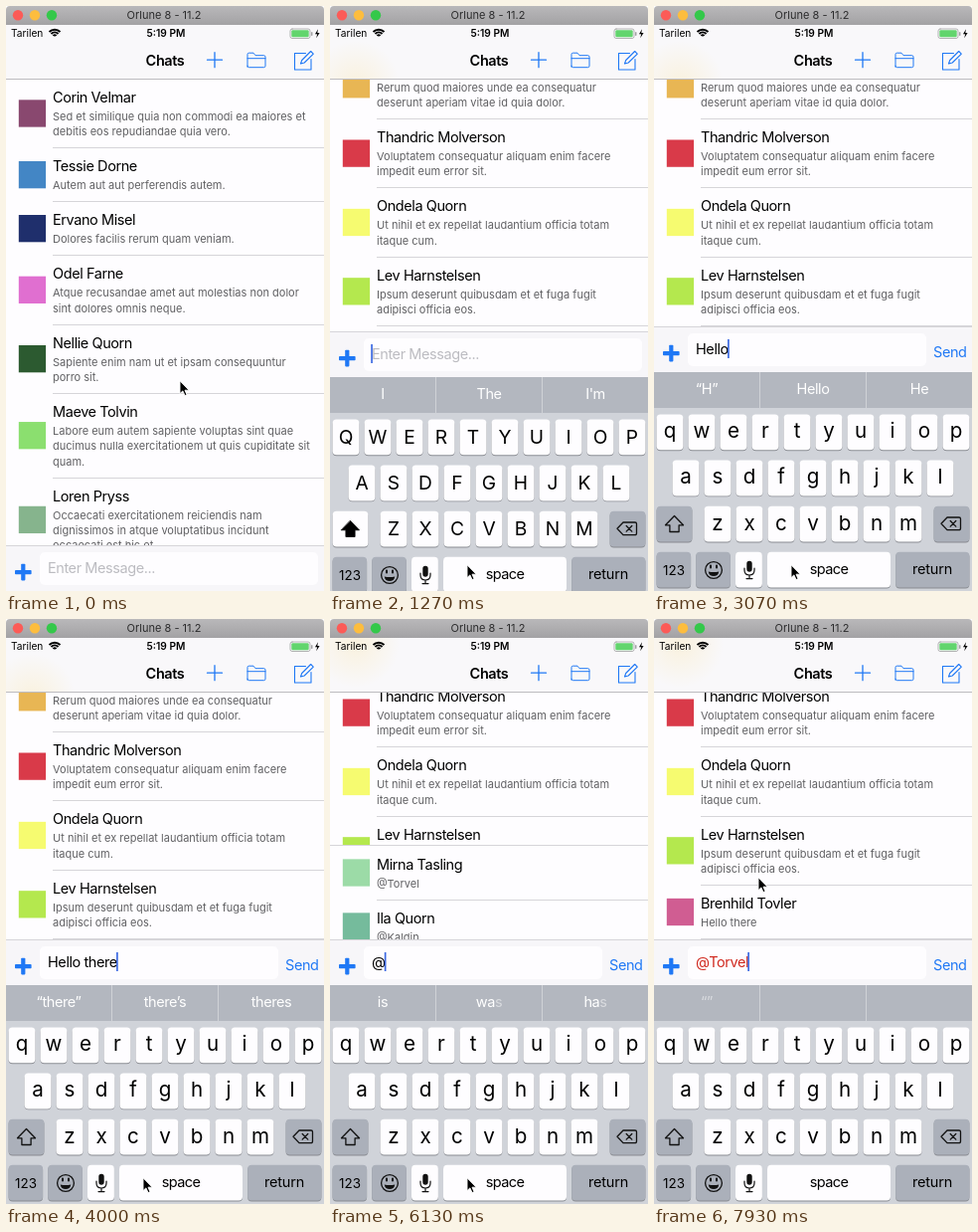
An HTML page with a canvas that plays this animation: 320 px wide and 588 px high, repeating every 8000 ms.

```html
<!DOCTYPE html>
<html lang="en">
<head>
<meta charset="utf-8">
<title>Chats</title>
<style>
  html, body { margin: 0; width: 100%; height: 100%; overflow: hidden; background: #fff; }
  canvas { display: block; width: 320px; height: 588px; }
</style>
</head>
<body>
<canvas id="stage"></canvas>
<script>
const W = 320, H = 588, LOOP = 8000, FRAME = 1000 / 15;
const canvas = document.getElementById('stage');
const ctx = canvas.getContext('2d');
const ratio = window.devicePixelRatio || 1;
canvas.width = W * ratio;
canvas.height = H * ratio;

const BLUE = '#1f78f5', LINE = '#d6d5d9';
const LIST_TOP = 73.3, BAR_HEIGHT = 46, BAR_DOCKED = 322, KEYBOARD_TRAVEL = 220;
const KEY_TOP = 410.5, KEY_PITCH = 46.1, KEY_HEIGHT = 35.8;
const OPEN = 1005, JUMP = 1195, TYPE = 2550, KEY_STEP = 112, SENT = 4060, MENTION = 5930, PICK = 7730;
const PHRASE = 'Hello there', HANDLE = '@Torvel';

const chats = [
  ['#89486f', 'Corin Velmar', 'Sed et similique quia non commodi ea maiores et', 'debitis eos repudiandae quia vero.'],
  ['#4386c5', 'Tessie Dorne', 'Autem aut aut perferendis autem.'],
  ['#1f2f6c', 'Ervano Misel', 'Dolores facilis rerum quam veniam.'],
  ['#e06fd0', 'Odel Farne', 'Atque recusandae amet aut molestias non dolor', 'sint dolores omnis neque.'],
  ['#2c5a30', 'Nellie Quorn', 'Sapiente enim nam ut et ipsam consequuntur', 'porro sit.'],
  ['#8bdf6f', 'Maeve Tolvin', 'Labore eum autem sapiente voluptas sint quae', 'ducimus nulla exercitationem ut quis cupiditate sit', 'quam.'],
  ['#86b48d', 'Loren Pryss', 'Occaecati exercitationem reiciendis nam', 'dignissimos in atque voluptatibus incidunt', 'occaecati est hic et.'],
  ['#e8b654', '', 'Rerum quod maiores unde ea consequatur', 'deserunt aperiam vitae id quia dolor.'],
  ['#d93a49', 'Thandric Molverson', 'Voluptatem consequatur aliquam enim facere', 'impedit eum error sit.'],
  ['#f6fb70', 'Ondela Quorn', 'Ut nihil et ex repellat laudantium officia totam', 'itaque cum.'],
  ['#b4e84e', 'Lev Harnstelsen', 'Ipsum deserunt quibusdam et et fuga fugit', 'adipisci officia eos.']
];
const sentChat = ['#d05d92', 'Brenhild Tovler', PHRASE];
const matches = [['#9cdba7', 'Mirna Tasling', HANDLE], ['#75bb9c', 'Ila Quorn', '@Kaldin']];

// Text after "|" is shown half faded.
const START_WORDS = ['I', 'The', "I'm"];
const suggestions = [
  [0, START_WORDS],
  [2660, ['“H”', 'Hello', 'He']],
  [3130, ['“Hello”', 'Hello’s', 'Hellos']],
  [3330, ['there', 'and', 'I']],
  [3730, ['“there”', 'there’s', 'theres']],
  [4130, START_WORDS],
  [6060, ['is', 'wa|s', 'ha|s']],
  [6190, ['is', 'was', 'has']],
  [7790, ['|“”', '', '']]
];

// Pointer path: time and tip position.
const pointer = [[0, 175, 377], [200, 175, 377], [800, 138, 562], [6450, 138, 562], [7500, 105, 260], [LOOP, 105, 260]];

const rowHeight = row => 54 + (row.length - 3) * 15.35;
const smooth = p => p * p * (3 - 2 * p);
const settle = seconds => seconds <= 0 ? 1 : (1 + 22 * seconds) * Math.exp(-22 * seconds);

function rect(x, y, w, h, color, radius = 0) {
  ctx.fillStyle = color;
  ctx.beginPath();
  ctx.roundRect(x, y, w, h, radius);
  ctx.fill();
}

function text(str, x, y, size, color, { weight = 400, align = 'left', spacing = 0 } = {}) {
  ctx.font = `${weight} ${size}px Inter, Roboto, sans-serif`;
  ctx.letterSpacing = spacing + 'px';
  ctx.textAlign = align;
  ctx.fillStyle = color;
  ctx.fillText(str, x, y);
  return ctx.measureText(str).width;
}

const body = (str, x, y, color, options) => text(str, x, y, 14.5, color, { spacing: -0.42, ...options });

function path(d, x, y, { fill, stroke, width = 1.2 }) {
  const shape = new Path2D(d);
  ctx.save();
  ctx.translate(x, y);
  ctx.lineJoin = ctx.lineCap = 'round';
  if (fill) { ctx.fillStyle = fill; ctx.fill(shape); }
  if (stroke) { ctx.strokeStyle = stroke; ctx.lineWidth = width; ctx.stroke(shape); }
  ctx.restore();
}

function clipped(x, y, w, h, draw) {
  ctx.save();
  ctx.beginPath();
  ctx.rect(x, y, w, h);
  ctx.clip();
  draw();
  ctx.restore();
}

function drawRows(rows, y) {
  for (const row of rows) {
    const [color, name, ...lines] = row, h = rowHeight(row);
    if (y < H && y + h > 0) {
      rect(12.8, y + h / 2 - 13.65, 27.3, 27.3, color);
      body(name, 47, y + 23.6, '#000');
      lines.forEach((line, i) => text(line, 47, y + 41.6 + i * 15.35, 11.01, '#606063'));
      rect(47, Math.round(y + h - 0.5), W - 47, 1, LINE);
    }
    y += h;
  }
}

function listAt(t) {
  const rows = t >= SENT ? [...chats, sentChat] : chats;
  const height = rows.reduce((sum, row) => sum + rowHeight(row), 0);
  let y = t >= JUMP ? BAR_DOCKED - 0.5 - height : LIST_TOP;
  if (t >= SENT) y += rowHeight(sentChat) * settle((t - SENT) / 1000);
  return { rows, y };
}

function drawMatches() {
  clipped(0, 227, W, BAR_DOCKED - 227, () => {
    rect(0, 227, W, 95, '#fefdff');
    rect(0, 227, W, 1, LINE);
    drawRows(matches, 228);
  });
}

function drawHeader(listY) {
  rect(0, 0, W, 74, '#f9f8fa');
  // The amber avatar shines faintly through the translucent bar.
  const glowY = listY + 520;
  if (glowY < 100) {
    const glow = ctx.createRadialGradient(26, glowY, 4, 26, glowY, 44);
    glow.addColorStop(0, 'rgba(250,215,110,.18)');
    glow.addColorStop(1, 'rgba(250,215,110,0)');
    rect(0, 19, 76, 54, glow);
  }
  rect(0, 73, W, 1, '#bdbcc0');

  rect(0, 0, W, 19, '#fff');
  const metal = ctx.createLinearGradient(0, 0, 0, 19);
  metal.addColorStop(0, '#b9b8ba');
  metal.addColorStop(1, '#a3a2a4');
  rect(0, 0, W, 19, metal, [4, 4, 0, 0]);
  ['#fc5b57', '#fdbd3e', '#34c84a'].forEach((color, i) => rect(6.8 + i * 17, 4, 10.4, 10.4, color, 5.2));
  text('Orlune 8 - 11.2', 159, 13.3, 11, '#2c2c2d', { align: 'center' });

  text('Tarilen', 5, 31.2, 10.2, '#000');
  for (const r of [2.2, 5, 7.8]) {
    ctx.beginPath();
    ctx.arc(49, 31.5, r, -Math.PI * 0.75, -Math.PI * 0.25);
    ctx.lineWidth = 1.9;
    ctx.strokeStyle = '#000';
    ctx.stroke();
  }
  text('5:19 PM', 161, 31.2, 10.2, '#000', { weight: 600, align: 'center' });
  path('M2 0H18Q20 0 20 2V7.5Q20 9.5 18 9.5H2Q0 9.5 0 7.5V2Q0 0 2 0Z', 286, 23, { stroke: '#a2a2a4', width: 0.8 });
  rect(287.3, 24.3, 17.4, 7, '#62d56d', 1.2);
  rect(307, 26, 1.5, 4, '#a2a2a4', 1);
  path('M3 0L0 5H2.2L1.2 9L4.6 3.8H2.3Z', 311, 23.2, { fill: '#000' });

  body('Chats', 160, 60, '#000', { weight: 600, align: 'center' });
  path('M-7.5 0H7.5M0 -7.5V7.5', 210, 54.2, { stroke: BLUE, width: 1.3 });
  path('M0 14V1.5Q0 0 1.5 0H6L8 2.5H16.5Q18 2.5 18 4V13Q18 14.5 16.5 14.5H1.5Q0 14.5 0 13M0 5.5H18', 243, 47.2, { stroke: BLUE, width: 1 });
  path('M11 2H0V18.5H16.5V8M6 12.5L7.2 9L16.2 0L18.8 2.6L9.7 11.5Z', 290.5, 45.5, { stroke: BLUE, width: 1.1 });
}

function inputAt(t) {
  if (t >= PICK) return { value: HANDLE, since: PICK };
  if (t >= MENTION) return { value: '@', since: MENTION };
  if (t >= SENT) return { value: '', since: SENT };
  if (t < TYPE) return { value: '', since: OPEN };
  const last = Math.min(Math.floor((t - TYPE) / KEY_STEP), PHRASE.length - 1);
  return { value: PHRASE.slice(0, last + 1), since: TYPE + last * KEY_STEP };
}

function drawInputBar(t, y, { value, since }) {
  rect(0, y, W, BAR_HEIGHT, '#f7f6f9');
  rect(0, y, W, 1, LINE);
  rect(9, y + 25, 16.6, 4.2, BLUE, 0.8);
  rect(15.2, y + 18.8, 4.2, 16.6, BLUE, 0.8);
  rect(34, y + 7, value ? 240 : 280, 33, '#fefdff', 5);
  let caret = 41.2;
  if (value) {
    caret += body(value, 42, y + 28, value === HANDLE ? '#d0291f' : '#000');
    body('Send', 281, y + 30.6, BLUE);
  } else {
    body('Enter Message...', 42, y + 28, '#bcbcc1');
  }
  if (t >= OPEN && (t - since) % 1000 < 600) rect(caret, y + 13, 1.7, 19, '#3c69e2');
}

function key(x, row, w, color) {
  const y = KEY_TOP + row * KEY_PITCH;
  rect(x, y + 0.9, w, KEY_HEIGHT, '#898c92', 4);
  rect(x, y, w, KEY_HEIGHT, color, 4);
}

function drawSuggestions(t) {
  rect(0, 368, W, 36, '#b3b7bf');
  rect(106, 368, 1, 36, '#cfd2d7');
  rect(213, 368, 1, 36, '#cfd2d7');
  const words = suggestions.filter(([time]) => time <= t).pop()[1];
  words.forEach((word, i) => {
    const [solid, faded = ''] = word.split('|');
    const x = 53 + i * 107;
    ctx.font = '400 14.5px Inter, Roboto, sans-serif';
    ctx.letterSpacing = '-0.42px';
    const left = x - ctx.measureText(solid + faded).width / 2;
    const width = body(solid, left, 389.6, '#fff');
    body(faded, left + width, 389.6, 'rgba(255,255,255,.5)');
  });
}

function drawKeyboard(t, upper) {
  const light = '#fefdff', dark = '#abb0ba';
  rect(0, 368, W, 222, '#d0d3d9');
  drawSuggestions(t);

  ['qwertyuiop', 'asdfghjkl', 'zxcvbnm'].forEach((letters, row) => {
    [...letters].forEach((char, i) => {
      const x = [16, 32, 64][row] + i * 32, y = KEY_TOP + row * KEY_PITCH;
      key(x - 13.45, row, 26.9, light);
      if (upper) text(char.toUpperCase(), x, y + 24.4, 19.2, '#000', { align: 'center' });
      else text(char, x, y + 23.8, 20.6, '#000', { align: 'center' });
    });
  });

  key(2.6, 2, 35.8, upper ? light : dark);
  path('M0 -8.5L9 0.8H4.6V7.5H-4.6V0.8H-9Z', 20.5, 521, upper ? { fill: '#000', stroke: '#000', width: 0.8 } : { stroke: '#111', width: 1.3 });
  key(281.6, 2, 35.8, dark);
  path('M-10 0L-4 -6.3H8Q9.5 -6.3 9.5 -4.8V4.8Q9.5 6.3 8 6.3H-4ZM-0.8 -2.8L4.8 2.8M4.8 -2.8L-0.8 2.8', 299, 520.3, { stroke: '#111', width: 1.3 });

  key(2.6, 3, 34.5, dark);
  text('123', 20, 571.8, 13.4, '#000', { align: 'center' });
  key(42.2, 3, 34.6, dark);
  path('M8.4 0A8.4 8.4 0 1 1 -8.4 0A8.4 8.4 0 1 1 8.4 0', 60, 567, { stroke: '#111', width: 1.3 });
  path('M-5.3 1.4Q0 2.8 5.3 1.4Q4.4 6 0 6Q-4.4 6 -5.3 1.4Z', 60, 567, { fill: '#111' });
  rect(56, 561.5, 2, 4, '#111', 1);
  rect(62, 561.5, 2, 4, '#111', 1);
  key(82, 3, 26.9, light);
  rect(93.3, 557.8, 5.4, 11, '#111', 2.7);
  path('M-5 -2V0Q-5 5 0 5Q5 5 5 0V-2M0 5V8.6M-3 8.6H3', 96, 567, { stroke: '#111' });
  key(114, 3, 124, light);
  body('space', 176, 571.4, '#000', { align: 'center', spacing: -0.6 });
  key(243.2, 3, 74.2, dark);
  body('return', 280, 571.4, '#000', { align: 'center', spacing: -0.2 });
}

function drawPointer(t) {
  const i = pointer.findIndex(([time]) => time > t);
  const [t0, x0, y0] = pointer[i - 1], [t1, x1, y1] = pointer[i];
  const p = smooth((t - t0) / (t1 - t0));
  path('M0 0V12.6L2.9 9.9L5 14.6L7 13.7L5 9.2H9Z', x0 + (x1 - x0) * p, y0 + (y1 - y0) * p, { fill: '#000', stroke: '#fff', width: 0.9 });
}

function draw(now) {
  const t = Math.floor((now % LOOP + 5) / FRAME) * FRAME % LOOP;
  const drop = Math.round(KEYBOARD_TRAVEL * settle((t - OPEN) / 1000));
  const input = inputAt(t), list = listAt(t);

  ctx.setTransform(ratio, 0, 0, ratio, 0, 0);
  rect(0, 0, W, H, '#fefdff');
  drawRows(list.rows, list.y);
  if (input.value === '@') drawMatches();
  drawHeader(list.y);
  drawInputBar(t, BAR_DOCKED + drop, input);
  if (drop < KEYBOARD_TRAVEL) {
    ctx.save();
    ctx.translate(0, drop);
    drawKeyboard(t, !input.value);
    ctx.restore();
  }
  drawPointer(t);
}

let startTime;
function tick(now) {
  startTime ??= now;
  draw(now - startTime);
  requestAnimationFrame(tick);
}
draw(0);
requestAnimationFrame(tick);
</script>
</body>
</html>
```
